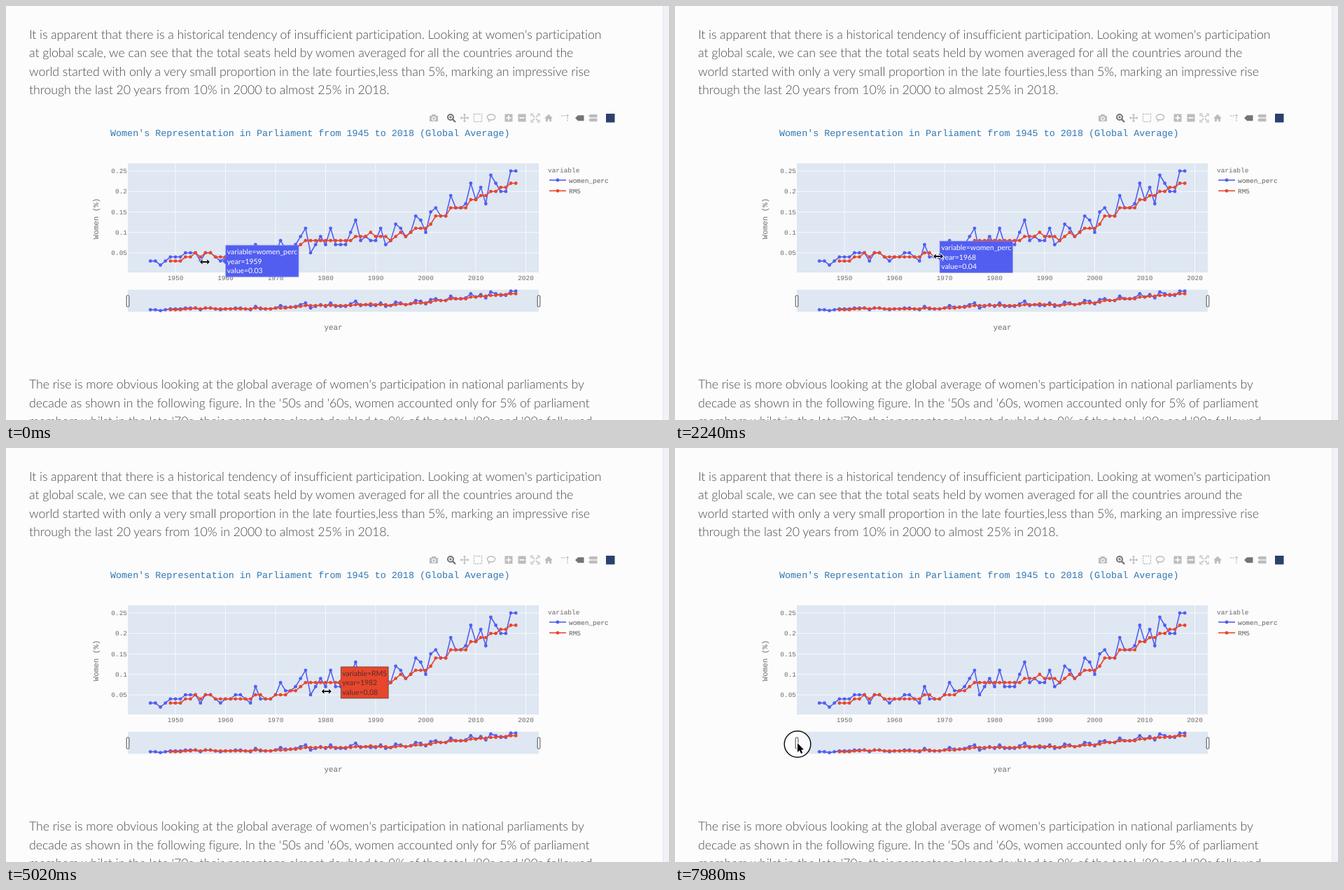
Recreate the animation shown at these times as an HTML page with a canvas. Size 947 px wide and 592 px high, loop 8000 ms.

```html
<!DOCTYPE html>
<html lang="en">
<head>
<meta charset="utf-8">
<title>Women's representation chart</title>
<style>
html, body { margin: 0; width: 100%; height: 100%; overflow: hidden; background: #fcfcfc; }
canvas { display: block; width: 947px; height: 592px; }
</style>
</head>
<body>
<canvas id="stage" width="947" height="592"></canvas>
<script>
const ctx = document.getElementById('stage').getContext('2d');
const LOOP = 8000;
const LAG = 80;
const PAGE = '#fcfcfc', PANEL = '#dee7f2', BLUE = '#525ef0', RED = '#e8462d';
const ICON = '#bcbcbc', ICON_ON = '#747474', LABEL = '#6c6c6c';
const MONO = '"Liberation Mono", monospace';
const SANS = 'Lato, sans-serif';
const TICK = '9.45px ' + MONO;

const intro = [
  "It is apparent that there is a historical tendency of insufficient participation. Looking at women's participation",
  'at global scale, we can see that the total seats held by women averaged for all the countries around the',
  'world started with only a very small proportion in the late fourties,less than 5%, marking an impressive rise',
  'through the last 20 years from 10% in 2000 to almost 25% in 2018.'
];
const outro = [
  "The rise is more obvious looking at the global average of women's participation in national parliaments by",
  "decade as shown in the following figure. In the '50s and '60s, women accounted only for 5% of parliament",
  "members whilst in the late '70s, their percentage almost doubled to 9% of the total. '80s and '90s followed"
];

// Linear interpolation through points of the form [position, ...values].
function along(points, at) {
  let i = 1;
  while (i < points.length - 1 && points[i][0] < at) i++;
  const [from, ...a] = points[i - 1], [to, ...b] = points[i];
  const k = Math.min(1, Math.max(0, (at - from) / (to - from)));
  return a.map((v, n) => v + (b[n] - v) * k);
}

// Percentages follow a trend with election-year spikes of a few points.
const trend = [
  [1945, 3], [1947, 2.4], [1949, 4], [1953, 4.8], [1957, 5], [1959, 3], [1963, 5], [1965, 3.4],
  [1969, 4.4], [1974, 7], [1984, 7], [1988, 8.6], [1992, 7.4], [1996, 9.4], [2004, 14.3],
  [2010, 18], [2016, 20.4], [2018, 25]
];
const spikes = {
  '-2': [1955, 1977, 2000, 2012],
  2: [1975, 1979, 1995, 1999, 2014, 2017],
  3: [1966, 1971, 1985, 1991, 1998, 2001, 2002, 2011],
  4: [1976, 1981, 1994, 2005],
  5: [1986, 2009, 2013]
};
const spikeAt = year => Number(Object.keys(spikes).find(s => spikes[s].includes(year)) || 0);

const women = Array.from({ length: 74 }, (_, i) => {
  const year = 1945 + i;
  return { year, value: (Math.round(along(trend, year)[0]) + spikeAt(year)) / 100 };
});
const mean = women.slice(4).map((d, i) => ({
  year: d.year,
  value: Math.round(women.slice(i, i + 5).reduce((sum, w) => sum + w.value, 0) * 20) / 100
}));
const series = [
  { name: 'women_perc', color: BLUE, ink: '#fff', edge: '#7a83f2', data: women },
  { name: 'RM5', color: RED, ink: '#50302b', edge: '#5b4540', data: mean }
];

const xOf = year => 242 + (year - 1950) * 7.15;
const yOf = v => 382.2 - v * 585;
const ySlider = v => 438 - v * 121;

// Pointer route: time, x, y.
const route = [
  [-80, 306, 365], [0, 284, 366], [320, 264, 349], [1150, 264, 349], [2160, 370, 358],
  [2240, 376, 358], [4000, 450, 335], [4080, 458, 335], [4450, 492, 335], [4940, 471, 336],
  [5020, 458, 348], [6460, 178, 414], [7200, 175, 424]
];
const pointer = t => {
  const [x, y] = along(route, t);
  return { x, y };
};

function text(str, x, y, font, color, align = 'left') {
  ctx.font = font;
  ctx.fillStyle = color;
  ctx.textAlign = align;
  ctx.fillText(str, x, y);
}

function box(x, y, w, h, color) {
  ctx.fillStyle = color;
  ctx.fillRect(x, y, w, h);
}

function trace(points, close) {
  ctx.beginPath();
  points.forEach(([x, y]) => ctx.lineTo(x, y));
  if (close) ctx.closePath();
}

function stroke(points, color, width, close) {
  trace(points, close);
  ctx.strokeStyle = color;
  ctx.lineWidth = width;
  ctx.stroke();
}

function poly(points, color) {
  trace(points, true);
  ctx.fillStyle = color;
  ctx.fill();
}

function dot(x, y, r, color) {
  ctx.beginPath();
  ctx.arc(x, y, r, 0, Math.PI * 2);
  ctx.fillStyle = color;
  ctx.fill();
}

function ring(x, y, rx, ry, color, width) {
  ctx.beginPath();
  ctx.ellipse(x, y, rx, ry, 0, 0, Math.PI * 2);
  ctx.strokeStyle = color;
  ctx.lineWidth = width;
  ctx.stroke();
}

function paragraph(lines, y) {
  ctx.letterSpacing = '-0.09px';
  lines.forEach((line, i) => text(line, 33, y + i * 26.6, '300 17.8px ' + SANS, '#4a4a4a'));
  ctx.letterSpacing = '0px';
}

function plotLine({ data, color }, yMap) {
  stroke(data.map(d => [xOf(d.year), yMap(d.value)]), color, 1.6);
  data.forEach(d => dot(xOf(d.year), yMap(d.value), 2.4, color));
}

// Arrows pointing out from a centre, evenly turned.
function arrows(count, x, y, r, head, color, width) {
  for (let i = 0; i < count; i++) {
    ctx.save();
    ctx.translate(x, y);
    ctx.rotate(i * Math.PI * 2 / count);
    stroke([[0, 0], [r - head, 0]], color, width);
    poly([[r, 0], [r - head, -head], [r - head, head]], color);
    ctx.restore();
  }
}

function tag(x, y, w, h, color) {
  poly([[x, y], [x + h / 2, y - h / 2], [x + w, y - h / 2], [x + w, y + h / 2], [x + h / 2, y + h / 2]], color);
}

function toolbar() {
  const y = 160;
  box(605, y - 3, 12, 8, ICON);
  box(608, y - 5, 6, 3, ICON);
  ring(611, y + 1, 2.4, 2.4, PAGE, 1.2);

  ring(635, y - 1, 4, 4, ICON_ON, 2);
  stroke([[638, y + 2], [642, y + 6]], ICON_ON, 2.4);
  box(633, y - 1.6, 4, 1.2, ICON_ON);
  box(634.4, y - 3, 1.2, 4, ICON_ON);

  arrows(4, 655, y, 6.3, 2.3, ICON, 1.4);

  ctx.lineWidth = 1.3;
  ctx.strokeStyle = ICON;
  ctx.setLineDash([2, 1.3]);
  ctx.strokeRect(668.5, y - 5.5, 11, 11);
  ctx.setLineDash([]);

  ring(693, y - 1, 5.7, 4, ICON, 1.4);
  stroke([[689, y + 2], [690.5, y + 3.5], [689, y + 6]], ICON, 1.3);

  for (const x of [718, 737]) {
    box(x - 5.5, y - 5.5, 11, 11, ICON);
    box(x - 3.5, y - 0.9, 7, 1.8, PAGE);
  }
  box(717.1, y - 3.5, 1.8, 7, PAGE);

  for (const sx of [-1, 1]) for (const sy of [-1, 1]) {
    const at = (a, b) => [756 + sx * a, y + sy * b];
    stroke([at(2.5, 6), at(6, 6), at(6, 2.5)], ICON, 1.2);
    stroke([at(1, 1), at(4.5, 4.5)], ICON, 1.5);
  }

  poly([[769, y + 0.5], [775, y - 5.2], [781, y + 0.5]], ICON);
  box(771, y, 2.8, 5.3, ICON);
  box(776.2, y, 2.8, 5.3, ICON);
  box(771, y, 8, 2, ICON);

  ctx.setLineDash([2, 1.5]);
  stroke([[793, y - 3], [800, y - 3]], ICON, 1.4);
  stroke([[802, y - 1], [802, y + 6]], ICON, 1.4);
  ctx.setLineDash([]);
  dot(802, y - 3.5, 1.5, ICON);

  tag(813, y + 0.2, 12.5, 8, ICON_ON);
  tag(832, y - 2.8, 12.5, 4.5, ICON);
  tag(832, y + 3, 12.5, 4.5, ICON);
  box(857, y - 6, 12.5, 12.5, '#2b406d');
}

function handle(x) {
  ctx.beginPath();
  ctx.roundRect(x - 1.8, 414, 3.6, 16, 1);
  ctx.fillStyle = '#fff';
  ctx.fill();
  ctx.strokeStyle = '#4a4a4a';
  ctx.lineWidth = 1;
  ctx.stroke();
}

function chart() {
  text("Women's Representation in Parliament from 1945 to 2018 (Global Average)",
    149, 186, '13.4px ' + MONO, '#3077b4');
  box(174, 225, 587, 156, PANEL);
  for (let year = 1950; year <= 2020; year += 10) {
    box(xOf(year) - 0.5, 225, 1, 156, '#f8fafd');
    text(year, xOf(year), 392, TICK, LABEL, 'center');
  }
  for (let v = 5; v <= 25; v += 5) {
    const y = yOf(v / 100);
    box(174, y - 0.5, 587, 1, '#f8fafd');
    text(v / 100, 173, y + 3.2, TICK, LABEL, 'right');
  }
  ctx.save();
  ctx.translate(131.5, 304);
  ctx.rotate(-Math.PI / 2);
  text('Women (%)', 0, 0, '10.9px ' + MONO, LABEL, 'center');
  ctx.restore();
  text('year', 467.5, 463, '10.9px ' + MONO, LABEL, 'center');

  series.forEach(s => plotLine(s, yOf));
  box(174, 405.7, 587, 31.6, PANEL);
  series.forEach(s => plotLine(s, ySlider));
  handle(174);
  handle(761);

  text('variable', 774, 238, TICK, LABEL);
  series.forEach((s, i) => {
    const y = 249 + i * 15.3;
    stroke([[776, y], [800, y]], s.color, 1.6);
    dot(788, y, 2.4, s.color);
    text(s.name, 804, y + 3.8, TICK, '#5c5c5c');
  });
}

function nearest(p) {
  if (p.y > 381) return null;
  let best = null, limit = 24;
  for (const s of series) for (const d of s.data) {
    const x = xOf(d.year), y = yOf(d.value);
    const dist = Math.hypot(x - p.x, y - p.y);
    if (dist < limit) {
      limit = dist;
      best = { s, d, x, y };
    }
  }
  return best;
}

function tooltip({ s, d, x, y }) {
  const lines = ['variable=' + s.name, 'year=' + d.year, 'value=' + d.value.toFixed(2)];
  const font = '10.4px ' + SANS;
  ctx.font = font;
  const left = x + 7.5, right = left + ctx.measureText(lines[0]).width + 4;
  const shape = [[x + 2.5, y], [left, y - 4.7], [left, y - 22.5], [right, y - 22.5],
    [right, y + 22.5], [left, y + 22.5], [left, y + 4.7]];
  poly(shape, s.color);
  stroke(shape, s.edge, 0.8, true);
  lines.forEach((line, i) => text(line, left + 2, y - 9.5 + i * 13.4, font, s.ink));
}

// Two or four outlined arrows around the pointer.
function arrowsCursor(count, { x, y }) {
  arrows(count, x, y, 8.3, 4.9, '#fff', 4);
  arrows(count, x, y, 7, 3.6, '#000', 2);
}

function arrowCursor({ x, y }) {
  const shape = [[0, -2], [0, 11], [3, 8.3], [5, 13], [7.2, 12], [5.2, 7.5], [9, 7.3]]
    .map(([a, b]) => [x + a, y + b]);
  stroke(shape, '#fff', 1.8, true);
  poly(shape, '#000');
}

function pressRing() {
  dot(175, 423.5, 19, 'rgba(255,255,255,.8)');
  handle(174);
  ring(175, 423.5, 18.8, 18.8, '#111', 1.5);
}

function draw(t) {
  ctx.textRendering = 'geometricPrecision';
  box(0, 0, 947, 592, PAGE);
  box(938, 0, 9, 592, '#f1f2f8');
  box(938, 0, 1, 592, '#e5e6ee');
  paragraph(intro, 46.5);
  toolbar();
  chart();
  paragraph(outro, 547);

  const hit = nearest(pointer(t - LAG));
  if (hit) tooltip(hit);

  const p = pointer(t);
  if (t >= 7500) pressRing();
  if (t >= 7000) arrowCursor(p);
  else arrowsCursor(p.y > 381 ? 4 : 2, p);
}

const start = performance.now();
function tick(now) {
  draw(Math.max(0, now - start) % LOOP);
  requestAnimationFrame(tick);
}
draw(0);
requestAnimationFrame(tick);
</script>
</body>
</html>
```
